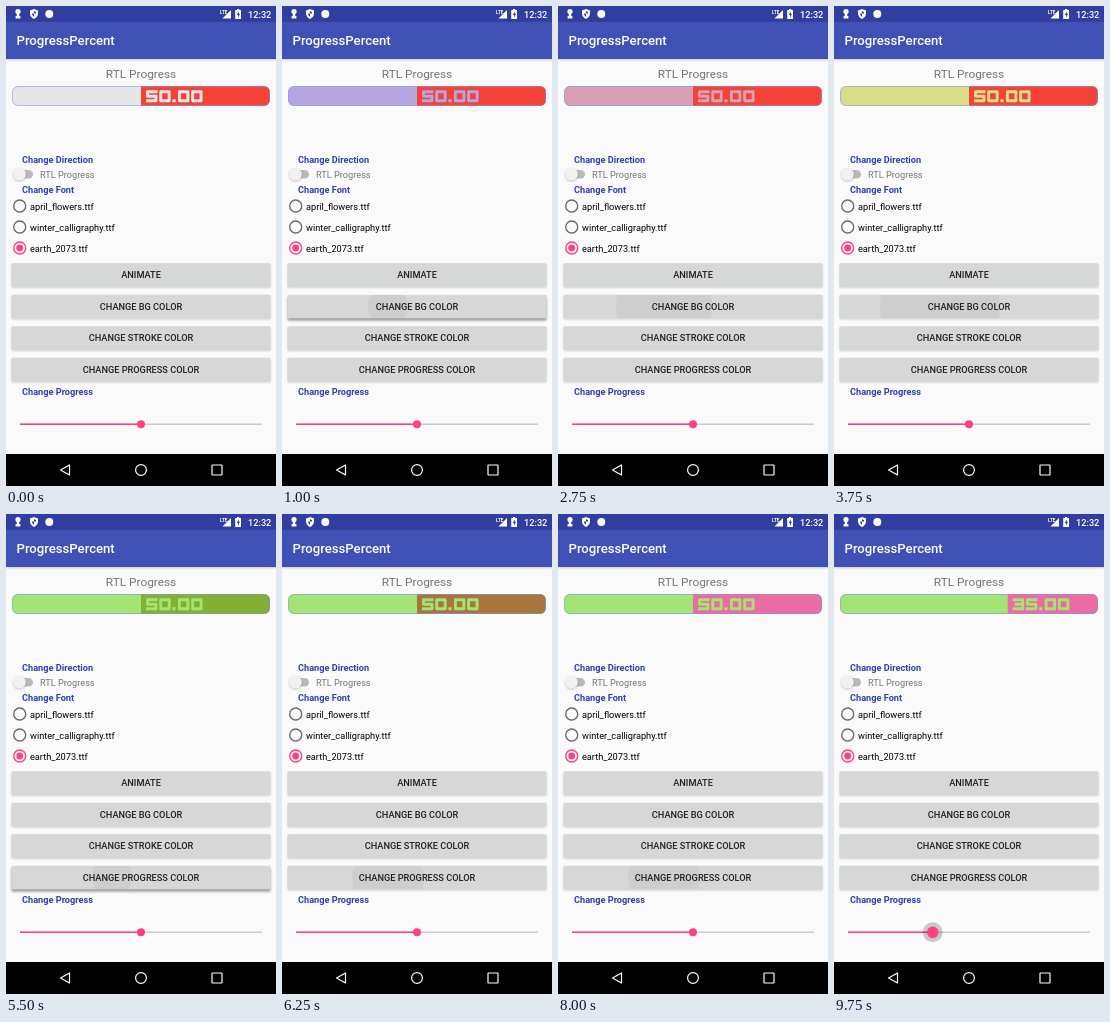
Animation of 270 by 480 pixels, one loop 10000 ms. Source, as an HTML page:

```html
<!DOCTYPE html>
<html lang="en">
<head>
<meta charset="utf-8">
<title>Progress demo</title>
<style>
  html, body { margin: 0; width: 100%; height: 100%; overflow: hidden; background: #fafafa; }
  svg { display: block; width: 100vw; height: 100vh; }
  text { font-family: Roboto, "Noto Sans", sans-serif; font-size: 9.2px; }
  .title { font-size: 13.14px; font-weight: 500; fill: #fff; }
  .head { font-size: 11.83px; fill: #757575; }
  .label { font-weight: 700; fill: #303fb0; }
  .btn text { font-weight: 500; fill: #212121; text-anchor: middle; }
  .btn rect { fill: #d6d7d7; }
  .btn .shade { fill: #000; opacity: .17; filter: url(#blur); }
  .btn.up .shade { opacity: .36; transform: translateY(1.3px); }
  .ripple { fill: #000; opacity: .045; }
  .ring { fill: none; stroke: #6b6b6b; stroke-width: 1.4; }
  .pink { fill: #ff4081; }
  .nav { fill: none; stroke: #fff; stroke-width: 1.2; }
  #num { fill: none; stroke-width: 2.9; stroke-linejoin: round; }
</style>
</head>
<body>
<svg viewBox="0 0 270 480" preserveAspectRatio="none">
  <defs>
    <filter id="blur" x="-5%" y="-30%" width="110%" height="160%"><feGaussianBlur stdDeviation="1"/></filter>
    <clipPath id="barClip"><rect x="6" y="80" width="258" height="20" rx="6"/></clipPath>
  </defs>

  <rect width="270" height="480" fill="#fafafa"/>
  <rect y="15" width="270" height="39" fill="#000" opacity=".2" filter="url(#blur)"/>
  <rect y="15" width="270" height="38" fill="#3f51b5"/>
  <rect width="270" height="15.8" fill="#303f9f"/>

  <!-- status bar -->
  <g fill="#fff">
    <circle cx="12" cy="5.5" r="2.6"/>
    <path d="M10.8 7h2.4v3h1.2v2.6H9.6V10h1.2z"/>
    <path d="M28 3l4 1.6v3c0 2.600-1.700 4.500-4 5.300-2.300-.8-4-2.700-4-5.300v-3z"/>
    <path d="M28 5.200v5.500c-1.200-.6-2-1.700-2-3.100h4V6z" fill="#303f9f"/>
    <circle cx="43.300" cy="8" r="4"/>
    <text x="214" y="7.500" style="font-size:4.500px;font-weight:700">LTE</text>
    <path d="M225 4v8.500h-8.500z"/>
    <path d="M231 3h2.200v1h1.800v9h-5.800V4H231z"/>
    <path d="M232.800 5.300l-2 3.800h1.200v2.600l2-3.900h-1.200z" fill="#303f9f"/>
    <text x="242" y="11.800" style="font-weight:500">12:32</text>
  </g>
  <text class="title" x="10.500" y="39">ProgressPercent</text>
  <text class="head" x="135" y="71.500" text-anchor="middle">RTL Progress</text>

  <!-- progress bar -->
  <g clip-path="url(#barClip)">
    <rect id="track" x="6" y="80" width="258" height="20"/>
    <rect id="fill" y="80" height="20"/>
  </g>
  <rect x="6.500" y="80.500" width="257" height="19" rx="5.500" fill="none" stroke="#7d9df0" stroke-opacity=".55"/>
  <path id="num"/>

  <text class="label" x="16" y="156.700">Change Direction</text>
  <rect x="11" y="164" width="16" height="8.500" rx="4.250" fill="#b9b9b9"/>
  <circle cx="13.500" cy="169" r="6.300" opacity=".25" filter="url(#blur)"/>
  <circle cx="13.500" cy="168.300" r="6.300" fill="#f1f1f1"/>
  <text x="34" y="171.700" fill="#757575">RTL Progress</text>

  <text class="label" x="16" y="187">Change Font</text>
  <g fill="#000">
    <circle class="ring" cx="13.700" cy="200" r="6"/><text x="24" y="203.500">april_flowers.ttf</text>
    <circle class="ring" cx="13.700" cy="221" r="6"/><text x="24" y="224.500">winter_calligraphy.ttf</text>
    <circle class="ring" cx="13.700" cy="242" r="6" style="stroke:#ff4081"/>
    <circle class="pink" cx="13.700" cy="242" r="3.400"/><text x="24" y="245.500">earth_2073.ttf</text>
  </g>

  <g id="buttons"></g>

  <text class="label" x="16" y="388.700">Change Progress</text>
  <path d="M14 418.300H256" stroke="#cbcbcb" stroke-width="1.400"/>
  <path id="seek" stroke="#ff4081" stroke-width="1.400"/>
  <circle id="halo" cy="418.300" r="10" fill="#000" opacity=".2"/>
  <circle id="thumb" class="pink" cy="418.300"/>

  <!-- navigation bar -->
  <rect y="448" width="270" height="32"/>
  <path class="nav" d="M63.500 459v10l-9-5z" stroke-linejoin="round"/>
  <circle class="nav" cx="135" cy="464" r="5.400"/>
  <rect class="nav" x="206" y="459" width="10" height="10" rx=".5"/>
</svg>
<script>
  const LOOP = 10000, STEP = 250;
  const $ = id => document.getElementById(id);
  const set = (el, attrs) => { for (const k in attrs) el.setAttribute(k, attrs[k]); };

  // Each list holds [step, value]; a value stays until the next entry.
  const trackColors = [[0, '#e6e6e6'], [2, '#c9d98c'], [4, '#b5a6e0'], [6, '#72d9db'], [8, '#e0c58a'],
    [10, '#d9a0b4'], [12, '#8fb8e6'], [14, '#d8de86'], [16, '#a4e474']];
  const fillColors = [[0, '#f44336'], [22, '#82b030'], [24, '#a8763c'], [26, '#5872c4'], [27, '#b0904a'],
    [28, '#13a379'], [30, '#8a68c0'], [31, '#c98a50'], [32, '#ec6ba0']];
  const percents = [[0, 50], [36, 47], [37, 43], [38, 39], [39, 35]];
  const bgRipple = [[0, 0], [1, 20], [2, 36], [3, 60], [4, 20], [5, 50], [6, 36], [7, 71], [8, 20], [9, 50],
    [10, 20], [11, 48], [12, 20], [13, 50], [14, 20], [15, 60], [16, 0]];
  const fillRipple = [[0, 0], [22, 20], [23, 48], [24, 20], [25, 36], [26, 49], [30, 20], [31, 48],
    [32, 36], [33, 60], [34, 0]];
  const at = (list, step) => list.filter(e => e[0] <= step).pop()[1];

  const labels = ['ANIMATE', 'CHANGE BG COLOR', 'CHANGE STROKE COLOR', 'CHANGE PROGRESS COLOR'];
  $('buttons').innerHTML = labels.map((label, i) => {
    const y = 257.2 + 31.5 * i;
    const box = `x="5.500" width="259" height="23.600" rx="1.300"`;
    return `<g class="btn" id="btn${i}">
      <clipPath id="clip${i}"><rect ${box} y="${y}"/></clipPath>
      <rect class="shade" ${box} y="${y + 1.2}"/><rect ${box} y="${y}"/>
      <circle class="ripple" cx="106" cy="${y + 11.8}" r="0" clip-path="url(#clip${i})"/>
      <text x="135" y="${y + 15.1}">${label}</text></g>`;
  }).join('');

  // Wide square digits, each 11.5 by 12.
  const glyphs = {
    0: 'm1.5 1.500h8.500v9h-8.500z',
    1: 'm3 1.500h3.500v10.500',
    2: 'm0 1.500h10v4.500h-8.500v4.500h10',
    3: 'm0 1.500h10v9h-10m2-4.500h8',
    4: 'm1.500 0v6.500h10m-1.500-6.500v12',
    5: 'm11.500 1.500h-10v4.500h8.500v4.500h-10',
    6: 'm11.500 1.500h-10v9h8.500v-4.500h-8.500',
    7: 'm0 1.500h10v10.500',
    8: 'm1.500 1.500h8.500v9h-8.500zm0 4.500h8.500',
    9: 'm0 10.500h10v-9h-8.500v4.500h8.500',
    '.': 'm0 10.500h3.200'
  };
  const write = (text, x, y) => [...text].map(c => {
    const d = `M${x} ${y}${glyphs[c]}`;
    x += c === '.' ? 5.5 : 13.2;
    return d;
  }).join('');

  function press(i, r) {
    const b = $('btn' + i);
    b.classList.toggle('up', r === 20);
    set(b.querySelector('.ripple'), { r });
  }

  function draw(now) {
    const step = Math.floor((now % LOOP) / STEP);
    const pct = at(percents, step), color = at(trackColors, step);
    const split = 264 - 2.58 * pct, knob = 14 + 2.42 * pct;
    const held = step >= 35;
    set($('track'), { fill: color });
    set($('fill'), { x: split, width: 264 - split, fill: at(fillColors, step) });
    set($('num'), { d: write(pct.toFixed(2), split + 5, 84.2), stroke: color });
    press(1, at(bgRipple, step));
    press(3, at(fillRipple, step));
    set($('seek'), { d: `M14 418.3H${knob}` });
    set($('halo'), { cx: knob, visibility: held ? 'visible' : 'hidden' });
    set($('thumb'), { cx: knob, r: held ? 5.8 : 4 });
  }

  let start;
  function tick(now) {
    start ??= now;
    draw(Math.max(0, now - start));
    requestAnimationFrame(tick);
  }
  draw(0);
  requestAnimationFrame(tick);
</script>
</body>
</html>
```
